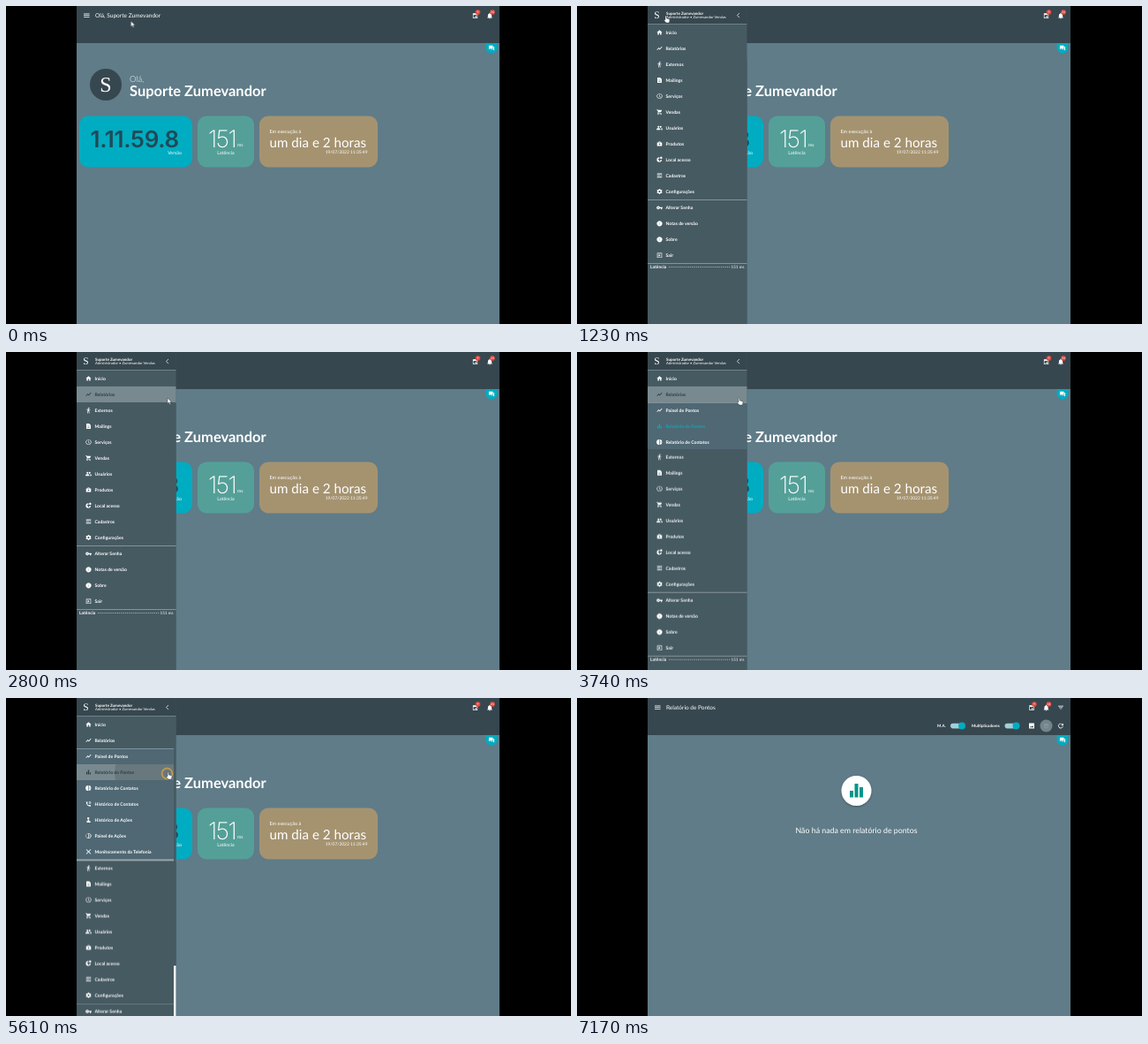
An HTML page for the animation above (8000 ms loop, 640 px wide and 360 px high).

```html
<!DOCTYPE html>
<html lang="pt-BR">
<head>
<meta charset="utf-8">
<title>Painel</title>
<style>
  html, body { margin: 0; width: 100%; height: 100%; overflow: hidden; background: #000; }
  svg { display: block; width: 100vw; height: 100vh; }
  text { font-family: Lato, "Open Sans", sans-serif; text-rendering: geometricPrecision; white-space: pre; }
  .light { font-weight: 300; }
  .bold { font-weight: 700; }
  .num { font-family: Inter, sans-serif; }
  .serif { font-family: "Liberation Serif", serif; }
  .mid { text-anchor: middle; }
  .end { text-anchor: end; }

  .a { animation: 8s linear infinite; }
  .s { animation: 8s step-end infinite; }

  .cursor { animation-name: cursor; }
  @keyframes cursor {
    0%, 1.25% { transform: translate(141.5px, 17px); }
    2.875%, 11.6% { transform: translate(89px, 10px); }
    12.5%, 20% { transform: translate(100px, 11px); }
    22.5%, 25% { transform: translate(168px, 12px); }
    25.875%, 30% { transform: translate(175px, 14px); }
    35%, 54.25% { transform: translate(183px, 52px); }
    58.75%, 81.375% { transform: translate(183px, 84px); }
    89.6%, 100% { transform: translate(72px, 12px); }
  }
  .hand { animation-name: hand; }
  @keyframes hand { 0% { opacity: 0; } 2% { opacity: 1; } 30.5% { opacity: 0; } 38.75% { opacity: 1; } 79.25%, 100% { opacity: 0; } }
  .arrow { animation-name: arrow; }
  @keyframes arrow { 0% { opacity: 1; } 2% { opacity: 0; } 30.5% { opacity: 1; } 38.75% { opacity: 0; } 79.25%, 100% { opacity: 1; } }

  .drawer { animation-name: drawer; }
  @keyframes drawer {
    0%, 11.45% { transform: translateX(-116px); animation-timing-function: cubic-bezier(.4, 0, .2, 1); }
    15.2%, 70.4% { transform: none; animation-timing-function: cubic-bezier(.4, 0, .2, 1); }
    73.3%, 100% { transform: translateX(-116px); }
  }
  .lower { animation-name: lower; }
  @keyframes lower {
    0%, 45.6% { transform: none; }
    46.75% { transform: translateY(52px); animation-timing-function: ease-out; }
    49%, 100% { transform: translateY(126.5px); }
  }
  .edge { animation-name: edge; }
  @keyframes edge { 0%, 46.75% { opacity: 0; } 49%, 100% { opacity: .85; } }
  .bar { animation-name: bar; }
  @keyframes bar { 0% { opacity: 0; } 47.6%, 100% { opacity: 1; } }

  .hot0 { animation-name: hot0; }
  .hot1 { animation-name: hot1; }
  .hot2 { animation-name: hot2; }
  .hot3 { animation-name: hot3; }
  @keyframes hot0 { 0% { opacity: 0; } 30.8% { opacity: 1; } 33.3%, 100% { opacity: 0; } }
  @keyframes hot1 { 0% { opacity: 0; } 33.3% { opacity: 1; } 55%, 100% { opacity: 0; } }
  @keyframes hot2 { 0% { opacity: 0; } 55% { opacity: 1; } 57.5%, 100% { opacity: 0; } }
  @keyframes hot3 { 0% { opacity: 0; } 57.5%, 100% { opacity: 1; } }

  .ripple { animation-name: ripple; }
  @keyframes ripple { 0%, 68.5% { transform: scale(0); } 70.125% { transform: scale(.53); } 71.8%, 100% { transform: scale(1); } }
  .ring1 { animation-name: ring1; }
  @keyframes ring1 {
    0%, 9.6% { transform: scale(0); opacity: 1; }
    10.8% { transform: scale(1); opacity: 1; }
    12.5% { transform: scale(.5); opacity: .7; }
    14%, 100% { transform: scale(0); opacity: 0; }
  }
  .ring2 { animation-name: ring2; }
  @keyframes ring2 { 0%, 47% { transform: scale(0); } 49%, 54.25% { transform: scale(1); } 56%, 100% { transform: scale(0); } }
  .ring3 { animation-name: ring3; }
  @keyframes ring3 {
    0%, 66.75% { transform: scale(0); opacity: 1; }
    68.5% { transform: scale(1); opacity: 1; }
    70.125% { transform: scale(.92); opacity: .75; }
    71.8%, 100% { transform: scale(0); opacity: 0; }
  }

  .dash { animation-name: dash; }
  @keyframes dash { 0% { opacity: 1; } 71.25%, 100% { opacity: 0; } }
  .home { animation-name: home; }
  @keyframes home { 0% { opacity: 1; } 75.125%, 100% { opacity: 0; } }
  .report { animation-name: report; }
  @keyframes report { 0%, 75% { opacity: 0; } 75.875%, 100% { opacity: 1; } }
</style>
</head>
<body>
<svg viewBox="0 0 640 360" id="stage">
  <defs>
    <clipPath id="app"><rect x="80" width="479" height="360"/></clipPath>
    <clipPath id="row"><rect x="80" y="75" width="112.5" height="18"/></clipPath>
    <filter id="soft" x="-20%" y="-20%" width="140%" height="150%">
      <feDropShadow dx="0" dy=".8" stdDeviation=".8" flood-opacity=".35"/>
    </filter>
  </defs>
  <rect width="640" height="360"/>
  <g clip-path="url(#app)" fill="#fff">
    <rect x="80" width="480" height="360" fill="#5f7c88"/>
    <path d="M543.5 42h13v5.2a6.500 6.500 0 0 1-13 0z" fill="#00acc1"/>
    <rect x="80" width="480" height="42" fill="#37474f"/>
    <g id="common"></g>

    <g class="dash s">
      <circle cx="113" cy="89" r="18" fill="#37474f"/>
      <text class="serif mid" x="113" y="97" font-size="24">S</text>
      <text class="light" x="140" y="86" font-size="9.5">Olá,</text>
      <text class="bold" x="140" y="102" font-size="16.5">Suporte Zumevandor</text>
      <rect x="83" y="124.500" width="128" height="58" rx="10" fill="#00acc1"/>
      <rect x="217" y="124.500" width="64" height="58" rx="10" fill="#54a098"/>
      <rect x="287" y="124.500" width="134" height="58" rx="10" fill="#a59370"/>
      <text class="num" x="95.500" y="159.500" font-size="26" font-weight="600" letter-spacing="-.3" fill="#1f4a57">1.11.59.8</text>
      <text class="num" x="229" y="159.500" font-size="27" font-weight="200" letter-spacing="-1.5">151</text>
      <text x="262" y="159" font-size="5.200">ms</text>
      <text class="end" x="199" y="168" font-size="5.300">Versão</text>
      <text class="mid" x="249" y="168" font-size="5.300">Latência</text>
      <text x="298.500" y="144" font-size="5.500">Em execução à</text>
      <text x="298.500" y="159.500" font-size="15.2">um dia e 2 horas</text>
      <text class="end" x="409.500" y="167" font-size="4.900">19/07/2022 11:35:49</text>
    </g>

    <g class="home s" id="home">
      <text x="101" y="13" font-size="6.6">Olá, Suporte Zumevandor</text>
    </g>

    <g class="report a" id="report">
      <text x="101" y="13" font-size="6.500">Relatório de Pontos</text>
      <g class="bold" font-size="4.600">
        <text x="408" y="33.200">M.A.</text>
        <text x="447" y="33.200">Multiplicadores</text>
      </g>
      <circle cx="531.500" cy="31.500" r="7" fill="#75848b"/>
      <circle cx="316.500" cy="105" r="17" filter="url(#soft)"/>
      <path d="M309 105h4v7.500h-4zM314.500 97h4v15.500h-4zM320 101h4v11.500h-4z" fill="#00968c"/>
      <text class="mid" x="316.500" y="153" font-size="8.800">Não há nada em relatório de pontos</text>
    </g>

    <g class="drawer a">
      <rect x="80" width="112.500" height="360" fill="#465a62"/>
      <rect x="80" width="112.500" height="20" fill="#37474f"/>
      <text class="serif mid" x="90.500" y="14" font-size="11.500">S</text>
      <text class="bold" x="101" y="9.600" font-size="4.500">Suporte Zumevandor</text>
      <text x="101" y="14.200" font-size="4.200">Administrador • Zumevandor Vendas</text>
      <path d="M184 8l-2.500 2.600 2.500 2.600" fill="none" stroke="#fff" stroke-width=".7"/>
      <rect x="80" y="20" width="112.500" height=".8" opacity=".3"/>
      <g id="top"></g>
      <rect x="80" y="57" width="112.500" height="127" fill="#4f6873"/>
      <rect x="80" y="57" width="112.500" height=".8" opacity=".35"/>
      <g id="sub"></g>
      <g class="lower a">
        <rect x="80" y="57" width="112.500" height="400" fill="#465a62"/>
        <rect class="edge a" x="80" y="56.500" width="112.500" height="1"/>
        <g id="low"></g>
        <rect x="80" y="219" width="112.500" height="1" opacity=".35"/>
        <rect x="80" y="291" width="112.500" height="1" opacity=".35"/>
        <text class="bold" x="83" y="297" font-size="4.900">Latência</text>
        <path d="M104 295.600H173.500" stroke="#fff" stroke-width=".8" stroke-dasharray="1 1.200" opacity=".85"/>
        <text class="end" x="189.500" y="297" font-size="4.600">151 ms</text>
      </g>
      <g class="bar s">
        <rect x="190" y="21" width="2.500" height="339" fill="#465a62"/>
        <rect x="190" y="303" width="2.500" height="57"/>
      </g>
    </g>

    <g fill="none" stroke="#e3a43c" stroke-width="2">
      <g transform="translate(88.500 13)"><circle class="ring1 a" r="6.500"/></g>
      <g transform="translate(183 52.500)"><circle class="ring2 a" r="6.500"/></g>
      <g transform="translate(182.500 85.500)"><circle class="ring3 a" r="6.500"/></g>
    </g>
    <g class="cursor a" stroke="#26343a" stroke-width=".45">
      <path class="arrow s" d="M0 0v6.500l1.500-1.400 1 2.400 1.100-.5-1-2.300h2z"/>
      <path class="hand s" d="M0 .6a.7.7 0 0 1 1.400 0V3l3 .7q.8.3.6 1.200L4.500 8H.8L-1.300 5.200q0-.9.900-.7L0 5z"/>
    </g>
  </g>
</svg>
<script>
  const icons = {
    home: 'M10 20v-6h4v6h5v-8h3L12 3 2 12h3v8z',
    trend: 'M2 17l7-8 4 4 7-8 2 1.500-9 10-4-4-5.500 6z',
    run: 'M13.500 1.500a2 2 0 1 0 .01 0zM10 9L7 23h2l2-8 2 2v6h2v-7.500l-2-2 .6-3q2 2.500 5.400 2.500v-2q-3 0-4.300-2.400L13 6.500 6 8.300V13h2V9.600z',
    doc: 'M4 2h10l6 6v14H4zM8 11v2h8v-2zM8 15v2h8v-2z',
    clock: 'M12 2a10 10 0 1 0 .01 0zM12 4a8 8 0 1 1-.01 0zM11 7h2v5l3 3-1.500 1.500L11 13z',
    cart: 'M7 18a2 2 0 1 0 .01 0zM17 18a2 2 0 1 0 .01 0zM1 2v2h2l3.600 7.600L4 17h15v-2H8l1-2h8l4-8H6L5 2z',
    people: 'M8 5a3 3 0 1 0 .01 0zM16 5a3 3 0 1 0 .01 0zM1 19v-2c0-3 4-4 7-4s7 1 7 4v2zM17 19h6v-2c0-2.500-3-3.800-6-4q2 1 2 4z',
    bag: 'M3 7h5a4 4 0 0 1 8 0h5v13H3zM10 7h4a2 2 0 0 0-4 0zM10 10v7l6-3.500z',
    globe: 'M11 3a9 9 0 1 0 9 9h-3q-2 1-3 4l-3 3v-4l-5-5 3-1V7h4zM18 1a4 4 0 1 0 .01 0z',
    list: 'M3 4h18v3H3zM3 10h12v3H3zM17 10h4v3h-4zM3 16h18v3H3z',
    gear: 'M10 2h4l.6 3 2.400 1.300 3-1 2 3.400-2.300 2.200v2.200l2.300 2.200-2 3.400-3-1-2.400 1.300-.6 3h-4l-.6-3L7 17.700l-3 1-2-3.400 2.300-2.200v-2.200L2 8.700l2-3.400 3 1L9.400 5zM12 8.500a3.500 3.500 0 1 0 .01 0z',
    key: 'M7 6a6 6 0 1 0 5.700 8H17v4h4v-4h2v-4H12.700A6 6 0 0 0 7 6zM7 10a2 2 0 1 0 .01 0z',
    info: 'M12 2a10 10 0 1 0 .01 0zM11.500 7h1v2h-1zM11.500 11h1v6h-1z',
    exit: 'M3 3h18v18H3zM5 5v14h14V5zM10 7l5 5-5 5-1.500-1.500L11 13H6v-2h5L8.500 8.500z',
    bars: 'M4 10h4v10H4zM10 4h4v16h-4zM16 13h4v7h-4z',
    pie: 'M11 2v20A10 10 0 0 1 11 2zM13 2v9h9A10 10 0 0 0 13 2zM13 13v9a10 10 0 0 0 9-9z',
    slice: 'M12 2a10 10 0 1 0 .01 0zM11 4v16a8 8 0 0 1 0-16zM13 4v7h7a8 8 0 0 0-7-7zM13 13v7a8 8 0 0 0 7-7z',
    phone: 'M8 4l1 5-2 2q2 4 6 6l2-2 5 1v5Q4 21 3 4zM13 4h8v2h-8zM13 8h8v2h-8z',
    person: 'M11 2a4 4 0 1 0 .01 0zM9 11h5v5l5 1v5H7l-4-5h6z',
    cross: 'M3 5l2-2 7 7 7-7 2 2-7 7 7 7-2 2-7-7-7 7-2-2 7-7z',
    agenda: 'M4 4h16v17H4zM6 9v10h12V9zM12 13h4v4h-4z',
    bell: 'M10 20h4a2 2 0 0 1-4 0zM18 16v-5q0-5-4.500-6.300a1.500 1.500 0 0 0-3 0Q6 6 6 11v5l-2 2v1h16v-1z',
    filter: 'M3 6h18v2H3zM6 11h12v2H6zM10 16h4v2h-4z',
    menu: 'M1 5h22v2.500H1zM1 11h22v2.500H1zM1 17h22v2.500H1z',
    image: 'M3 3h18v18H3zM5 17h14l-4-6-4 5-2-3z',
    refresh: 'M17.600 6.400A8 8 0 1 0 19.700 14h-2.100A6 6 0 1 1 12 6q2.500 0 4.200 1.800L13 11h7V4z',
    chat: 'M2 3h15v10H6l-4 4zM19 7h3v14l-4-4H7v-2h12z'
  };
  const add = (id, html) => document.getElementById(id).insertAdjacentHTML('beforeend', html);
  const icon = (name, x, y, size = 7.4, fill = 'inherit') =>
    `<path d="${icons[name]}" fill="${fill}" fill-rule="evenodd" transform="translate(${x - size / 2} ${y - size / 2}) scale(${size / 24})"/>`;
  const label = (name, text, y) =>
    icon(name, 93.5, y) + `<text class="bold" x="100.5" y="${y + 1.7}" font-size="5.1">${text}</text>`;
  const rows = (list, y0) => list.map(([name, text], i) => label(name, text, y0 + i * 18)).join('');
  const hot = (n, name, text, y, extra = '') =>
    `<g class="hot${n} s"><rect x="80" y="${y - 9}" width="112.5" height="18" fill="#788a90"/>${extra}<g fill="#2f3d44">${label(name, text, y)}</g></g>`;
  const badge = (x, n) =>
    `<circle cx="${x}" cy="7" r="2.8" fill="#e5493f"/><text class="mid" x="${x}" y="8.2" font-size="3.4">${n}</text>`;
  const alerts = x => icon('agenda', x, 11, 8) + badge(x + 3, 9) + icon('bell', x + 16.5, 11, 8.6) + badge(x + 19.5, 24);
  const toggle = x =>
    `<rect x="${x}" y="28.8" width="16" height="5.6" rx="2.8" fill="#a4cfd6"/><circle cx="${x + 13}" cy="31.6" r="4" fill="#00acc1"/>`;

  add('common', icon('menu', 91.3, 10.6, 7.2) + icon('chat', 550, 47.6, 7.4));
  add('home', alerts(531.5));
  add('report', alerts(515) + icon('filter', 548, 10.8, 8) + toggle(423) + toggle(484.5) +
    icon('image', 515, 31.5, 8) + icon('image', 531.5, 31.5, 7, '#84939a') + icon('refresh', 548, 31.5, 8.6));

  const first = [['home', 'Início'], ['trend', 'Relatórios']];
  add('top', rows(first, 30) + first.map(([name, text], n) => hot(n, name, text, 30 + n * 18)).join(''));

  const ripple = '<g clip-path="url(#row)"><g transform="translate(183 85)"><circle class="ripple a" r="112" fill="#000" opacity=".13"/></g></g>';
  add('sub', label('trend', 'Painel de Pontos', 66) +
    `<g fill="#00acc1">${label('bars', 'Relatório de Pontos', 84)}</g>` +
    rows([['pie', 'Relatório de Contatos'], ['phone', 'Histórico de Contatos'], ['person', 'Histórico de Ações'],
      ['slice', 'Painel de Ações'], ['cross', 'Monitoramento da Telefonia']], 102) +
    hot(2, 'trend', 'Painel de Pontos', 66) + hot(3, 'bars', 'Relatório de Pontos', 84, ripple));

  add('low', rows([['run', 'Externos'], ['doc', 'Mailings'], ['clock', 'Serviços'], ['cart', 'Vendas'],
    ['people', 'Usuários'], ['bag', 'Produtos'], ['globe', 'Local acesso'], ['list', 'Cadastros'],
    ['gear', 'Configurações']], 66) +
    rows([['key', 'Alterar Senha'], ['info', 'Notas de versão'], ['info', 'Sobre'], ['exit', 'Sair']], 228.3));
</script>
</body>
</html>
```
